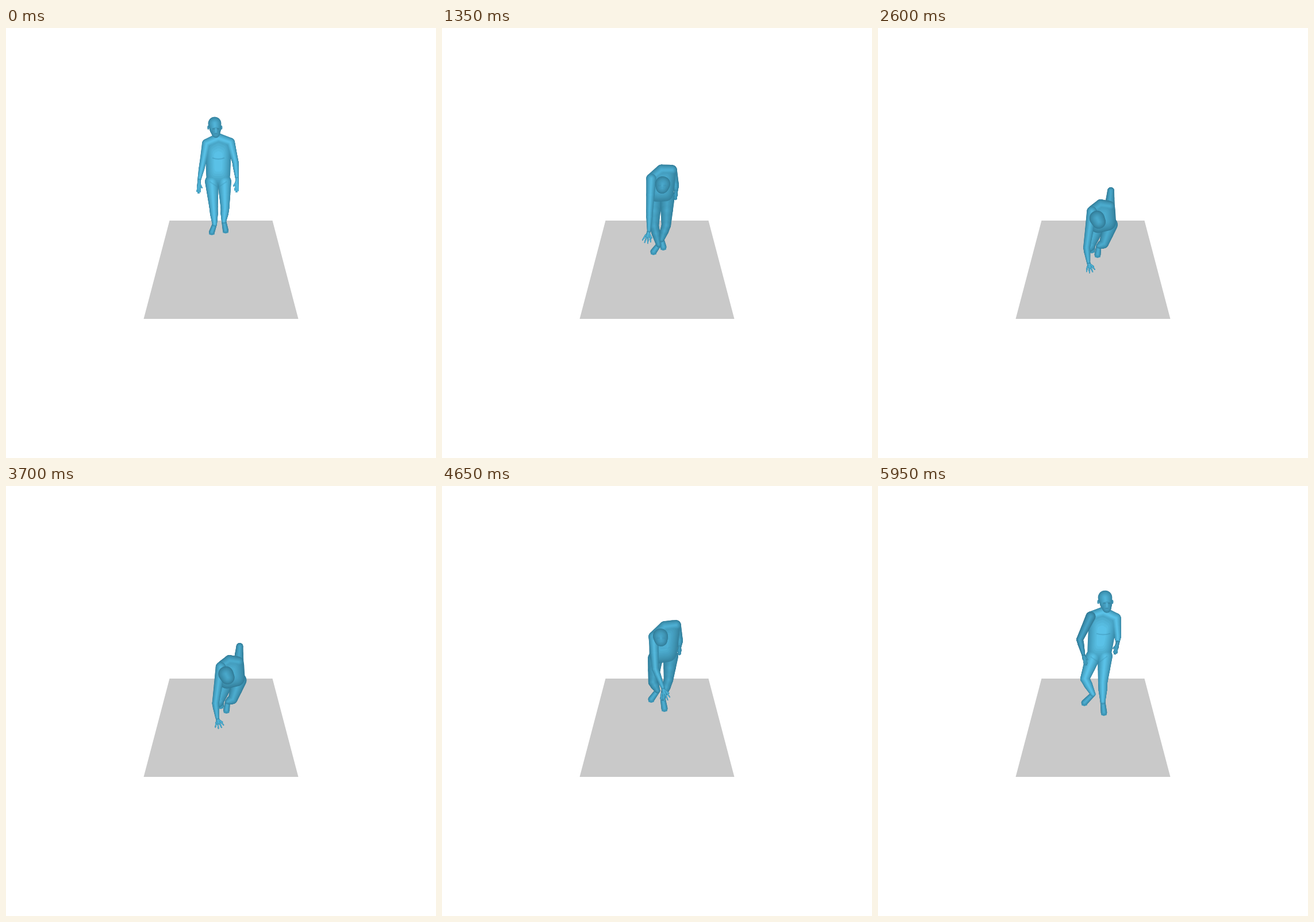
An HTML page with a canvas for the animation above (6 s loop, 748 px wide and 748 px high).

```html
<!DOCTYPE html>
<html lang="en">
<head>
<meta charset="utf-8">
<title>Bending figure</title>
<style>
html, body { margin: 0; width: 100%; height: 100%; overflow: hidden; background: #fff; }
canvas { display: block; }
</style>
</head>
<body>
<canvas id="stage" width="748" height="748"></canvas>
<script>
const ctx = document.getElementById('stage').getContext('2d');
const LOOP = 6000, STEP = 50, LAYERS = 10;
const keys = [];

// Every joint entry is [left x, left y, right x, right y] as seen on screen;
// head is [crown x, crown y, chin x, chin y]; tone is [bend, size, arm shade].
function key(time, pose) {
  keys.push({ time, pose });
}
const mapPose = (pose, fn) =>
  Object.fromEntries(Object.entries(pose).map(([name, v]) => [name, fn(v, name)]));
const shift = (pose, dx, dy) =>
  mapPose(pose, (v, name) => name === 'tone' ? v : v.map((n, i) => n + (i % 2 ? dy : dx)));
const blend = (a, b, u) =>
  mapPose(a, (v, name) => v.map((n, i) => n + (b[name][i] - n) * u));

const upright = {
  tone: [0, 1, 0], head: [363, 166, 365, 184], shoulders: [349, 201, 390, 199],
  elbows: [342, 236, 399, 233], wrists: [336, 265, 402, 262], hands: [335, 288, 401, 286],
  hips: [358, 267, 380, 267], knees: [361, 311, 381, 313],
  ankles: [363, 341, 379, 336], toes: [358, 355, 382, 352]
};
const stepping = {
  tone: [0, 1.03, 0], head: [377, 174, 378, 193], shoulders: [358, 207, 402, 206],
  elbows: [350, 243, 408, 242], wrists: [341, 269, 413, 271], hands: [339, 291, 414, 297],
  hips: [365, 273, 389, 273], knees: [361, 320, 382, 322],
  ankles: [364, 346, 376, 347], toes: [359, 360, 381, 361]
};
const reaching = {
  tone: [.75, 1.1, 0], head: [384, 271, 383, 277], shoulders: [364, 262, 400, 247],
  elbows: [361, 318, 406, 272], wrists: [360, 352, 407, 284], hands: [355, 375, 406, 299],
  hips: [370, 293, 392, 292], knees: [369, 344, 390, 343],
  ankles: [377, 377, 382, 368], toes: [368, 389, 385, 381]
};
const crouched = {
  tone: [1, 1.1, 0], head: [381, 331, 384, 337], shoulders: [372, 319, 403, 310],
  elbows: [363, 382, 405, 283], wrists: [366, 407, 405, 295], hands: [371, 426, 404, 310],
  hips: [380, 348, 404, 342], knees: [368, 381, 393, 375],
  ankles: [373, 377, 384, 379], toes: [372, 386, 382, 394]
};
const rising = {
  tone: [.75, 1.1, 0], head: [380, 261, 381, 268], shoulders: [368, 262, 407, 242],
  elbows: [371, 318, 413, 268], wrists: [384, 350, 413, 280], hands: [390, 374, 413, 294],
  hips: [371, 300, 398, 296], knees: [367, 341, 394, 337],
  ankles: [375, 356, 384, 369], toes: [364, 371, 387, 387]
};
const swinging = {
  tone: [0, 1.08, .4], head: [390, 185, 393, 204], shoulders: [368, 220, 411, 220],
  elbows: [346, 252, 418, 255], wrists: [328, 272, 418, 274], hands: [320, 290, 415, 293],
  hips: [373, 290, 397, 289], knees: [363, 338, 393, 342],
  ankles: [374, 360, 389, 373], toes: [361, 375, 391, 393]
};
const settled = {
  tone: [0, 1.08, .8], head: [395, 194, 398, 213], shoulders: [370, 227, 414, 230],
  elbows: [351, 267, 417, 260], wrists: [357, 292, 417, 272], hands: [362, 312, 412, 293],
  hips: [374, 297, 395, 296], knees: [360, 335, 391, 342],
  ankles: [374, 362, 391, 375], toes: [359, 377, 393, 394]
};

key(0, upright);
key(650, stepping);
key(1000, { ...blend(stepping, reaching, .35), toes: [360, 373, 385, 381], ankles: [367, 358, 381, 366] });
key(1350, reaching);
key(1900, shift(crouched, 0, 2));
key(2600, crouched);
key(3700, shift(crouched, 1.5, -4));
key(3950, shift(crouched, 1.5, -4.5));
key(4650, rising);
key(5250, swinging);
key(5950, settled);

const slope = (i, get) => {
  const a = keys[i], b = keys[i + 1];
  return a && b ? (get(b.pose) - get(a.pose)) / (b.time - a.time) : 0;
};
// Harmonic tangents keep holds still and avoid overshoot.
function tangent(i, get) {
  const a = slope(i - 1, get), b = slope(i, get);
  return a * b <= 0 ? 0 : 2 * a * b / (a + b);
}
function poseAt(time) {
  let i = 0;
  while (i < keys.length - 2 && keys[i + 1].time <= time) i++;
  const a = keys[i], b = keys[i + 1], span = b.time - a.time;
  const u = Math.min(1, (time - a.time) / span), w = 1 - u;
  return mapPose(a.pose, (v, name) => v.map((n, j) => {
    const get = p => p[name][j];
    return n * w * w * (1 + 2 * u) + get(b.pose) * u * u * (3 - 2 * u)
      + span * u * w * (w * tangent(i, get) - u * tangent(i + 1, get));
  }));
}

const mix = (a, b, u) => a.map((n, i) => n + (b[i] - n) * u);
const css = c => `rgb(${c.map(Math.round)})`;
const joint = (pair, left) => left ? pair.slice(0, 2) : pair.slice(2);
const palette = shade => [
  mix([54, 134, 164], [46, 114, 140], shade),
  mix([94, 200, 238], [68, 160, 194], shade)
];

function taper(a, b, ra, rb) {
  const angle = Math.atan2(b[1] - a[1], b[0] - a[0]);
  const dist = Math.hypot(b[0] - a[0], b[1] - a[1]);
  const lean = Math.acos(Math.max(-1, Math.min(1, (ra - rb) / (dist || 1))));
  ctx.beginPath();
  ctx.arc(a[0], a[1], ra, angle + lean, angle - lean + Math.PI * 2);
  ctx.arc(b[0], b[1], rb, angle - lean, angle + lean);
  ctx.fill();
}
function chain(points, radii, k) {
  for (let i = 1; i < points.length; i++)
    taper(points[i - 1], points[i], radii[i - 1] * k, radii[i] * k);
}
// Nested layers from dark rim to bright core imitate a rounded surface.
function shaded(shade, paint, alpha = 1) {
  if (alpha <= 0) return;
  const [rim, core] = palette(shade);
  ctx.globalAlpha = alpha;
  for (let i = 0; i < LAYERS; i++) {
    const u = i / LAYERS;
    ctx.fillStyle = ctx.strokeStyle = css(mix(rim, core, u));
    paint(1 - u ** 1.5);
  }
  ctx.globalAlpha = 1;
}
function spot(x, y, rx, ry, color, alpha) {
  ctx.globalAlpha = alpha;
  ctx.fillStyle = color;
  ctx.beginPath();
  ctx.ellipse(x, y, rx, ry, 0, 0, Math.PI * 2);
  ctx.fill();
  ctx.globalAlpha = 1;
}
function crease(from, bend, to, alpha) {
  ctx.globalAlpha = alpha;
  ctx.strokeStyle = '#3b8fb0';
  ctx.lineWidth = 2;
  ctx.beginPath();
  ctx.moveTo(...from);
  ctx.quadraticCurveTo(...bend, ...to);
  ctx.stroke();
  ctx.globalAlpha = 1;
}

function hand(p, left, spread, shade, alpha) {
  const size = p.tone[1], side = left ? 1 : -1;
  const wrist = joint(p.wrists, left), tip = joint(p.hands, left);
  const d = [tip[0] - wrist[0], tip[1] - wrist[1]];
  const at = (along, angle) => {
    const c = Math.cos(angle) * along, s = Math.sin(angle) * along;
    return [wrist[0] + d[0] * c + d[1] * s, wrist[1] + d[1] * c - d[0] * s];
  };
  shaded(shade, k => {
    chain([wrist, at(.42, 0)], [2.6 * size, 3.3 * size], k);
    for (let f = 0; f < 4; f++) {
      const angle = side * (f - 1.5) * spread;
      chain([at(.42, angle), at(f % 3 ? .96 : .86, angle)], [1.3 * size, .8], k);
    }
    chain([at(.15, 0), at(.6, side * (.3 + spread))], [1.4 * size, .9], k);
  }, alpha);
}

function arm(p, left, k) {
  const [shoulder, elbow, wrist] = [p.shoulders, p.elbows, p.wrists].map(v => joint(v, left));
  chain([shoulder, mix(shoulder, elbow, .5), elbow, mix(elbow, wrist, .3), wrist],
    [8, 6.6, 5.4, 5, 2.9].map(r => r * p.tone[1]), k);
}

function leg(p, left, k) {
  const [hip, knee, ankle] = [p.hips, p.knees, p.ankles].map(v => joint(v, left));
  chain([hip, mix(hip, knee, .5), knee, mix(knee, ankle, .4), ankle],
    [11.8, 9.6, 7.4, 6.8, 4].map(r => r * p.tone[1]), k);
}

function foot(p, left) {
  const size = p.tone[1], ankle = joint(p.ankles, left), toe = joint(p.toes, left);
  shaded(.5, k => chain([ankle, toe], [4 * size, 5 * size], k));
  for (let i = -2; i < 3; i++)
    spot(toe[0] + i * 1.9, toe[1] + 4 * size - Math.abs(i) * .5, 1.1, 1.6, '#3f97b7', 1);
}

function torso(p, k) {
  const [bend, size] = p.tone, [lx, ly, rx, ry] = p.shoulders, [hlx, hly, hrx, hry] = p.hips;
  const inset = 6 * (1 - bend);
  const neck = [(lx + rx) / 2, (ly + ry) / 2 - (8 - 2 * bend) * size];
  const points = [[lx + inset, ly], neck, [rx - inset, ry], [hrx + 1, hry], [hlx - 1, hly]];
  const center = [(lx + rx + hlx + hrx) / 4, (ly + ry + hly + hry) / 4];
  const scaled = points.map(q => mix(center, q, .35 + .65 * k));
  const middle = i => mix(scaled[i % 5], scaled[(i + 1) % 5], .5);
  ctx.lineWidth = 17 * size * k;
  ctx.lineJoin = 'round';
  ctx.beginPath();
  ctx.moveTo(...middle(4));
  scaled.forEach((q, i) => {
    const a = middle(i + 4), b = middle(i);
    ctx.lineTo(...mix(a, q, .6));
    ctx.quadraticCurveTo(...q, ...mix(b, q, .6));
    ctx.lineTo(...b);
  });
  ctx.closePath();
  ctx.fill();
  ctx.stroke();
  chain([[lx, ly], neck, [rx, ry]], [8, 9, 8].map(r => r * size), k);
}

function head(p) {
  const [x, y, cx, cy] = p.head, [bend, size] = p.tone, face = 1 - bend;
  const turn = (cx - x) * .5, r = (11.4 + bend * .6) * size;
  const at = u => y + (cy - y) * u;
  for (const side of [-1, 1])
    spot(x + side * r + turn * .3, at(.4), 1.7, 3.6, '#3f93b2', face);
  shaded(.35 + bend * .35, k => chain([[x, y], mix([x, y], [cx, cy], .55), [cx, cy]],
    [r, r * (.86 + .08 * bend), (7 + 4 * bend) * size], k));
  spot(cx, at(.85), 7.5 * size, 9 * size, '#347f9b', face * .3);
  for (const side of [-1, 1])
    spot(cx + side * 4 * size, at(.52), 2.5 * size, 1.4, '#2d7089', face * .4);
  spot(cx + turn * .3, at(.68), 1.3, 4, '#5abce0', face * .6);
  spot(cx, at(1), 3, 1, '#2d7089', face * .4);
}

function ground() {
  ctx.fillStyle = '#fff';
  ctx.fillRect(0, 0, 748, 748);
  ctx.fillStyle = '#c9c9c9';
  ctx.beginPath();
  ctx.moveTo(284.5, 335);
  ctx.lineTo(463.5, 335);
  ctx.lineTo(508.5, 506);
  ctx.lineTo(239.5, 506);
  ctx.fill();
}

function creases(p) {
  const [lx, ly, rx, ry] = p.shoulders, [hlx, hly, hrx, hry] = p.hips;
  const [bend, size] = p.tone, face = 1 - bend;
  const mid = (lx + rx) / 2, chest = (ly + ry) / 2 + 26 * size, hip = (hlx + hrx) / 2;
  crease([lx + 10, chest], [mid, chest + 4], [rx - 10, chest], face * .45);
  crease([hlx - 4, hly], [hip - 5, hly + 7], [hip, hly + 10], face * .3);
  crease([hip, hly + 10], [hip + 5, hry + 7], [hrx + 4, hry], face * .3);
}

function draw(time) {
  const p = poseAt(time), [bend, , armShade] = p.tone;
  const sides = [true, false], backShade = Math.max(armShade, bend * .7);
  ground();
  hand(p, false, .1, backShade);
  shaded(backShade, k => arm(p, false, k));
  for (const left of sides) {
    foot(p, left);
    shaded(bend * .6, k => leg(p, left, k));
  }
  // Standing, the body is one smooth surface; bent over, the parts overlap.
  shaded(bend * .6, k => {
    for (const left of sides) {
      leg(p, left, k);
      arm(p, left, k);
    }
    torso(p, k);
  }, 1 - bend);
  shaded(bend * .6, k => torso(p, k), bend);
  creases(p);
  hand(p, false, .1, backShade, 1 - bend);
  hand(p, true, .1 + bend * .2, Math.max(.3, armShade));
  shaded(Math.max(armShade, bend * .3), k => arm(p, true, k), Math.max(bend, armShade));
  head(p);
}

const start = performance.now();
function tick() {
  const time = (performance.now() - start) % LOOP;
  draw(Math.floor(time / STEP) * STEP);
  requestAnimationFrame(tick);
}
tick();
</script>
</body>
</html>
```
